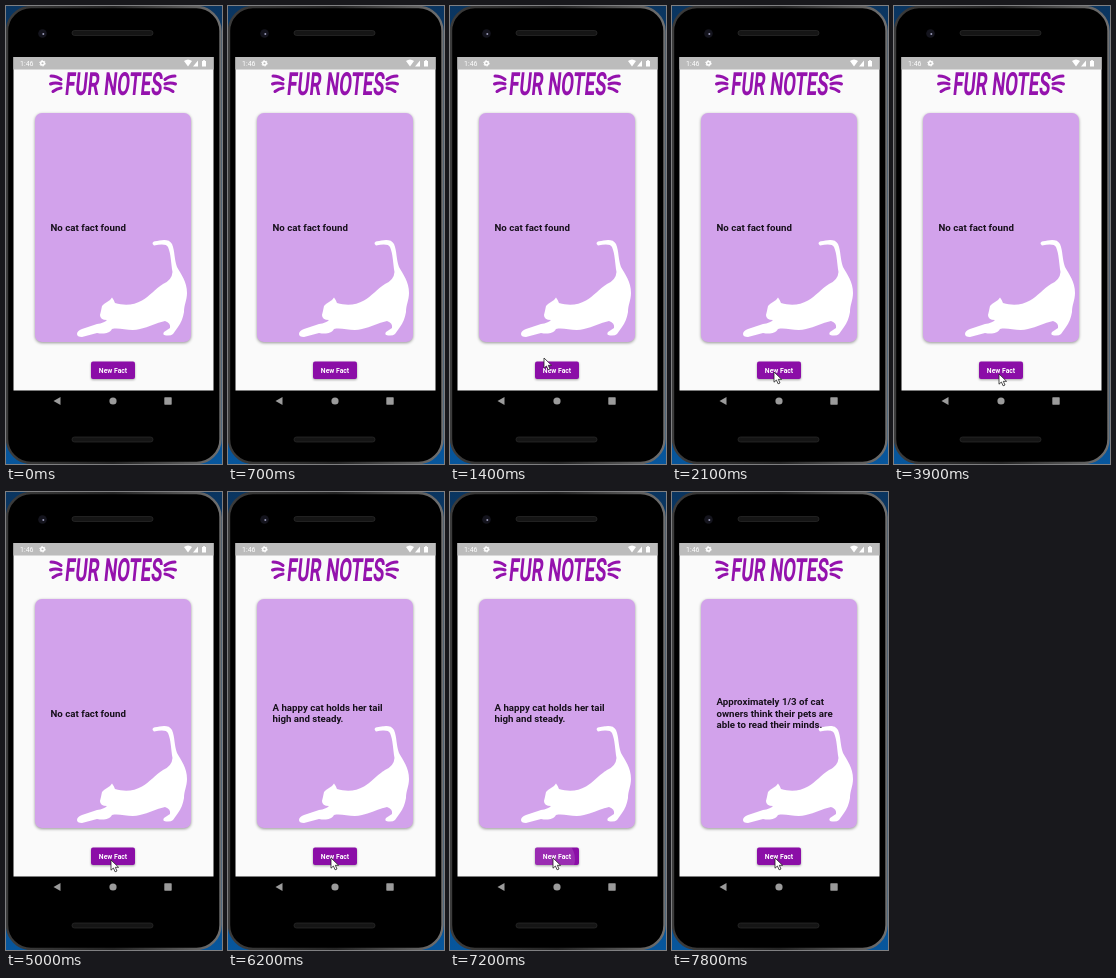
These frames come from a looping animation (216x458 px, 8000 ms). An HTML page:

```html
<!DOCTYPE html>
<html lang="en">
<head>
<meta charset="utf-8">
<title>Pet trivia app</title>
<style>
html, body { margin: 0; width: 100%; height: 100%; overflow: hidden; background: linear-gradient(#0a3560, #07569c); }
svg { display: block; width: 216px; height: 458px; font-family: Roboto, "Noto Sans", sans-serif; }
#card { filter: drop-shadow(0 1.5px 1.5px #0006); }
#button { filter: drop-shadow(0 1px 1px #0005); }
</style>
</head>
<body>
<svg viewBox="0 0 216 458">
  <defs>
    <clipPath id="buttonClip"><rect x="85" y="355.5" width="44" height="17.500" rx="2"/></clipPath>
    <linearGradient id="rim">
      <stop stop-color="#3c3c3c"/>
      <stop offset=".5" stop-color="#242424"/>
      <stop offset="1" stop-color="#707070"/>
    </linearGradient>
    <g id="whiskers" fill="none" stroke="#9412ad" stroke-width="3" stroke-linecap="round">
      <path d="M45 70q6 0 10 3.500M44.500 78q5-2 10.500 0M47 85.500q4-3 8-3.500"/>
    </g>
  </defs>

  <!-- phone body -->
  <rect x="1" y="1" width="213.500" height="456" rx="24" stroke="url(#rim)" stroke-width="2.400"/>
  <g fill="#151515" stroke="#2b2b2b" stroke-width=".7">
    <rect x="66" y="24.500" width="81" height="5" rx="2.500"/>
    <rect x="66" y="431" width="81" height="5" rx="2.500"/>
  </g>
  <circle cx="36.500" cy="27.500" r="4.300" fill="#14141d"/>
  <circle cx="37.300" cy="28" r="1" fill="#9a9ab8"/>

  <!-- screen and status bar -->
  <path d="M7.500 51h200v333.500h-200z" fill="#fafafa"/>
  <path d="M7.500 51h200v12.500h-200z" fill="#bcbcbc"/>
  <g fill="#fff">
    <text x="14" y="60" font-size="7">1:46</text>
    <path d="M178 55q4-3 8 0l-4 5.500zM187 60.500l5-6v6zM196 55h1.200v-1h1.600v1h1.200v5.500h-4z"/>
  </g>
  <circle cx="36.500" cy="57.200" r="1.800" fill="none" stroke="#fff" stroke-width="1.500"/>
  <circle cx="36.500" cy="57.200" r="2.800" fill="none" stroke="#fff" stroke-width="1" stroke-dasharray="1.400 1.530"/>

  <!-- heading -->
  <use href="#whiskers"/>
  <use href="#whiskers" transform="matrix(-1 0 0 1 214 0)"/>
  <text transform="matrix(.58 0 -.1 1 107 89)" text-anchor="middle" font-size="32" font-weight="700" fill="#9412ad">FUR NOTES</text>

  <!-- card -->
  <rect id="card" x="29" y="107" width="156" height="229" rx="7" fill="#d2a2eb"/>
  <path fill="#fff" d="M148 239.500C146 238 146 236 149 235.300C155 234 163 232 166 238
    C169 245 168 253 171 261C175 268 181 276 181 287C181 294 178 299 178 306
    C177 312 175 317 172 321L167 328Q165 330 160 329.500
    Q156 329 158 326L164 322Q165 317 159 315C150 317 143 321 134 323
    C124 326 114 321 106 323C103 328 97 328 91 327L76 331Q71 331 71 328
    Q71 325 76 323L91 318Q98 317 101 314Q94 314 94 309Q95 305 96 300
    L98 298L104 294L106 291.500Q108 294 109 297C119 300 128 299 136 294.500
    C144 290 149 283 157 278Q166 274 166.500 266C165 257 165 248 162 241
    Q160 237 148 239.500z"/>
  <g id="fact" font-size="9.7" font-weight="700" fill="#17101b"></g>

  <!-- button -->
  <rect id="button" x="85" y="355.500" width="44" height="17.500" rx="2" fill="#8b0ea7"/>
  <circle id="ripple" cx="104" cy="367" fill="#fff" clip-path="url(#buttonClip)"/>
  <text x="107" y="367" text-anchor="middle" font-size="6.800" font-weight="700" fill="#fff">New Fact</text>

  <!-- navigation -->
  <g fill="#9b9b9b">
    <path d="M47.500 395l7-4v8z"/>
    <circle cx="107" cy="395" r="3.600"/>
    <rect x="158.300" y="391.300" width="7.400" height="7.400" rx=".6"/>
  </g>

  <path id="cursor" d="M0 0v10.200l2.400-2.200 1.700 3.800 1.900-.8-1.700-3.700h3.300z" fill="#fff" stroke="#222" stroke-width=".8"/>
</svg>
<script>
const $ = id => document.getElementById(id);
const LOOP = 8000, STEP = 100;
const facts = [
  [0, "No cat fact found"],
  [5500, "A happy cat holds her tail", "high and steady."],
  [7700, "Approximately 1/3 of cat", "owners think their pets are", "able to read their minds."]
];
// time, x, y of the pointer tip
const moves = [
  [900, -10, 460], [1400, 94, 352], [1800, 94, 352], [2100, 102, 366],
  [2400, 104, 367], [2700, 104, 367], [2800, 105, 368],
  [6000, 105, 368], [6200, 103, 366], [LOOP, 103, 366]
];
const presses = [4000, 7000];
let shown;

function pointer(t) {
  const i = moves.findIndex(m => m[0] > t);
  if (i < 1) return moves[0].slice(1);
  const [a, b] = [moves[i - 1], moves[i]];
  const k = (t - a[0]) / (b[0] - a[0]);
  return [1, 2].map(n => a[n] + (b[n] - a[n]) * k);
}

function showFact(t) {
  const fact = facts.findLast(f => f[0] <= t);
  if (fact === shown) return;
  shown = fact;
  const lines = fact.slice(1);
  $("fact").innerHTML = lines.map((line, i) =>
    `<text x="44.5" y="${224.6 + (i - (lines.length - 1) / 2) * 11.4}">${line}</text>`).join("");
}

function draw(now) {
  const t = Math.floor(now % LOOP / STEP) * STEP;
  showFact(t);
  $("cursor").setAttribute("transform", `translate(${pointer(t)})`);
  const start = presses.find(p => t >= p && t < p + 400);
  const k = start === undefined ? 1 : (t - start) / 400;
  $("ripple").setAttribute("r", 6 + 30 * k);
  $("ripple").setAttribute("opacity", 0.25 * (1 - k));
  requestAnimationFrame(draw);
}
draw(0);
</script>
</body>
</html>
```
